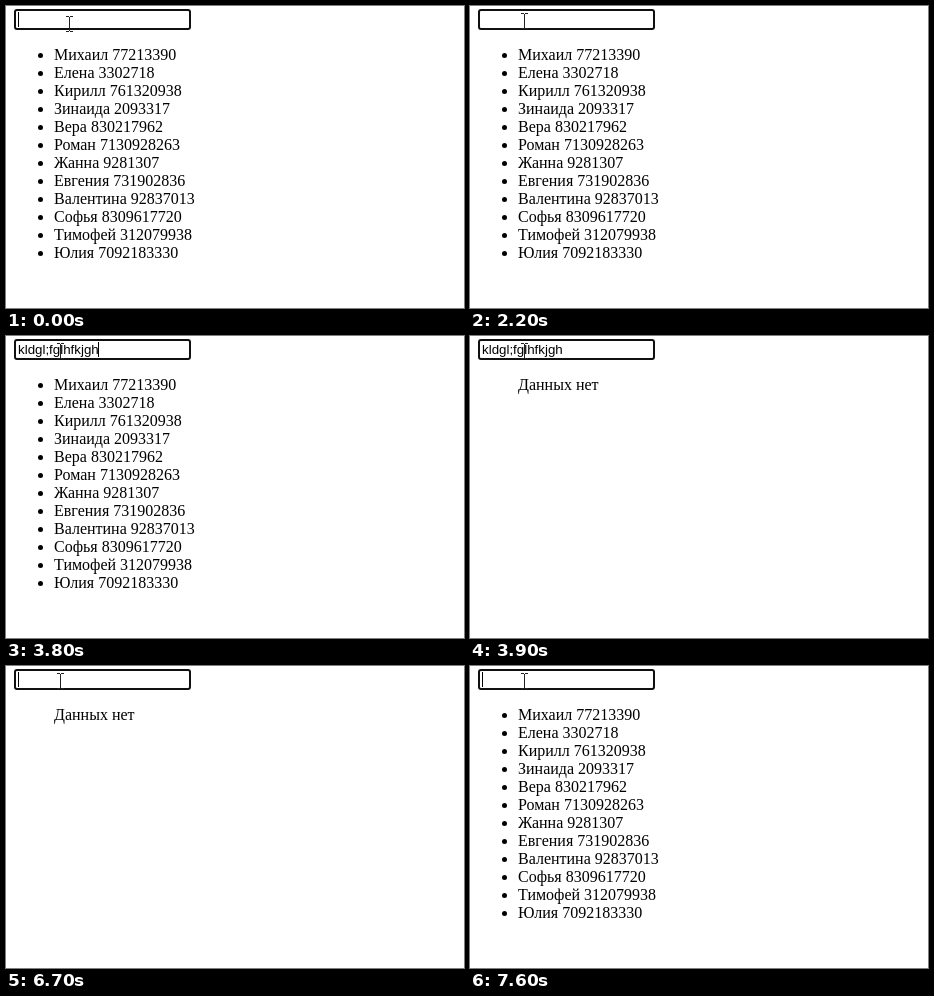
An HTML page for the animation above (8000 ms loop, 458 by 302 pixels).

```html
<!DOCTYPE html>
<html lang="ru">
<head>
<meta charset="utf-8">
<title>Поиск по списку</title>
<style>
  html, body { margin: 0; width: 100%; height: 100%; overflow: hidden; background: #fff; }
  body { position: relative; color: #000; font: 16px/18px "Liberation Serif", "Times New Roman", serif; }
  .field, .text, .caret, .pointer, ul, .empty { position: absolute; }
  .field { left: 8px; top: 3px; width: 177px; height: 21px; box-sizing: border-box; border: 2px solid #101010; border-radius: 3px; }
  .text { left: 12px; top: 6px; font: 13.3333px/15px "Liberation Sans", Arial, sans-serif; white-space: pre; }
  .caret { top: 6px; width: 1px; height: 15px; background: #000; }
  .pointer { left: 0; top: 0; width: 7px; height: 16px; }
  ul { left: 8px; top: 40px; margin: 0; padding-left: 40px; white-space: nowrap; }
  .empty { left: 48px; top: 40px; white-space: nowrap; }
</style>
</head>
<body>
<div class="field"></div>
<div class="text"></div>
<div class="caret"></div>
<ul></ul>
<div class="empty">Данных нет</div>
<svg class="pointer" viewBox="0 0 7 16" shape-rendering="crispEdges">
  <path d="M0 .5H3M4 .5H7M3.5 1V15M0 15.5H3M4 15.5H7" fill="none" stroke="#222"/>
</svg>
<script>
const LOOP = 8000, STEP = 100;
const QUERY = "kldgl;fglhfkjgh";
const CONTACTS = [
  "Михаил 77213390", "Елена 3302718", "Кирилл 761320938", "Зинаида 2093317",
  "Вера 830217962", "Роман 7130928263", "Жанна 9281307", "Евгения 731902836",
  "Валентина 92837013", "Софья 8309617720", "Тимофей 312079938", "Юлия 7092183330"
];
// Times at which the caret switches, starting from visible.
const BLINKS = [700, 1200, 1600, 1601, 1602, 2200, 2700, 3900, 4400, 4900, 5500, 6000, 6600, 7100, 7600]
  .filter(t => t < 1600 || t > 1602);

const find = selector => document.querySelector(selector);
const text = find(".text"), caret = find(".caret"), pointer = find(".pointer");
const list = find("ul"), empty = find(".empty");
const clamp = (v, low, high) => Math.min(high, Math.max(low, v));
const show = (element, on) => { element.style.visibility = on ? "visible" : "hidden"; };

for (const contact of CONTACTS) {
  list.appendChild(document.createElement("li")).textContent = contact;
}

function typedLength(t) {
  if (t < 5600) return clamp((t - 3000) / 50, 0, QUERY.length);
  if (t < 6000) return QUERY.length - 1;
  return clamp(Math.floor(13 * (6600 - t) / 600), 0, 13);
}

function draw(now) {
  const t = Math.floor(now % LOOP / STEP) * STEP;
  text.textContent = QUERY.slice(0, typedLength(t));
  caret.style.left = 12 + Math.floor(text.getBoundingClientRect().width) + "px";
  show(caret, BLINKS.filter(time => time <= t).length % 2 === 0);

  const filtered = t >= 3900 && t < 7000;
  show(list, !filtered);
  show(empty, filtered);

  const moved = clamp((t - 600) / 900, 0, 1);
  const x = Math.round(60 - 9 * moved), y = Math.round(10 - 3 * moved);
  pointer.style.transform = `translate(${x}px, ${y}px)`;
}

const start = performance.now();
function tick() {
  draw(performance.now() - start);
  requestAnimationFrame(tick);
}
tick();
</script>
</body>
</html>
```
